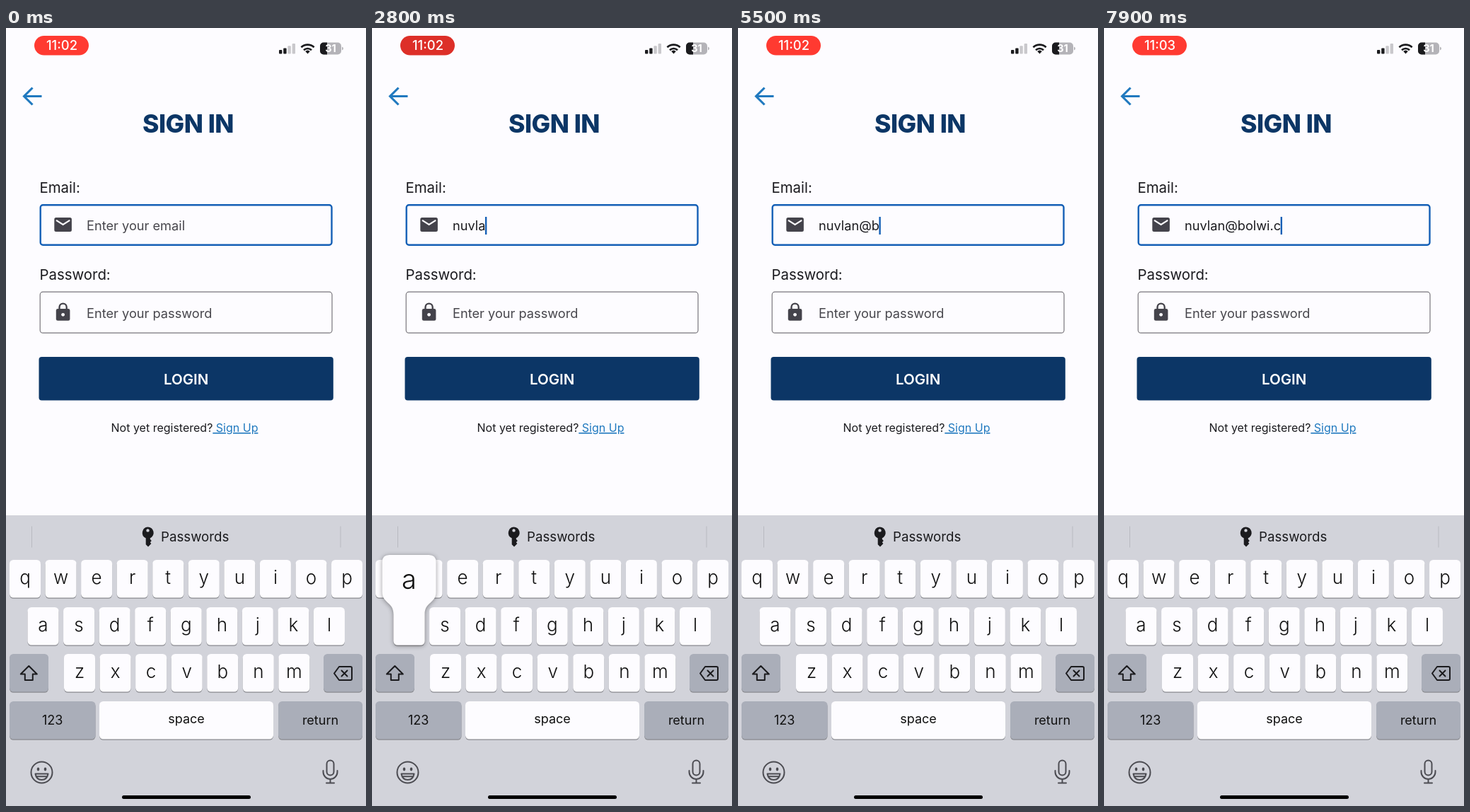
An HTML page for the animation above (8 s loop, 509x1100 px).

```html
<!DOCTYPE html>
<html lang="en">
<head>
<meta charset="utf-8">
<title>Sign in</title>
<style>
html, body { margin: 0; width: 100%; height: 100%; overflow: hidden; background: #fdfcff; }
svg { display: block; width: 509px; height: 1100px; font-family: Inter, "Open Sans", sans-serif; }
.mid { text-anchor: middle; }
.line { fill: none; stroke-linecap: round; stroke-linejoin: round; }
#popup path { fill: #fdfcff; filter: drop-shadow(0 1px 3px #0006); }
</style>
</head>
<body>
<svg viewBox="0 0 509 1100">
  <!-- status bar -->
  <rect id="pill" x="40" y="11" width="77" height="27.5" rx="13.75"/>
  <text id="clock" class="mid" x="79" y="31" font-size="18.4" font-weight="500" fill="#fff"></text>
  <g fill="#1b1b1e">
    <rect x="386" y="31" width="4.4" height="5.5" rx="1"/>
    <rect x="392.2" y="28.5" width="4.4" height="8" rx="1"/>
    <g fill="#c9c8cc">
      <rect x="398.4" y="25.3" width="4.4" height="11.2" rx="1"/>
      <rect x="404.6" y="22" width="4.4" height="14.5" rx="1"/>
    </g>
    <path d="M426.5 36.5l-3.3-3.4a4.8 4.8 0 0 1 6.6 0z"/>
  </g>
  <g class="line" stroke="#1b1b1e" stroke-width="2.7" style="stroke-linecap:butt">
    <path d="M421 31.2a8 8 0 0 1 11 0M417.4 27.3a13.2 13.2 0 0 1 18.2 0"/>
  </g>
  <rect x="444" y="20.5" width="30" height="17" rx="5" fill="#b4b3b8"/>
  <path d="M454 20.5h-5a5 5 0 0 0-5 5v7a5 5 0 0 0 5 5h5z" fill="#1b1b1e"/>
  <path d="M475 26.5q2 .7 2 2.5t-2 2.5z" fill="#b4b3b8"/>
  <text class="mid" x="459" y="34.3" font-size="14.5" font-weight="700" fill="#fff">31</text>

  <!-- form -->
  <path d="M50.5 96.5H26M37.5 84.5l-12 12 12 12" fill="none" stroke="#2079bf" stroke-width="3.1"/>
  <text class="mid" x="257.5" y="147.5" font-size="35.5" font-weight="800" letter-spacing="-.5" fill="#0c3666">SIGN IN</text>
  <g font-size="20.4" fill="#1b1b1f">
    <text x="47.5" y="233">Email:</text>
    <text x="47.5" y="356">Password:</text>
  </g>
  <rect x="48.7" y="250.2" width="411.8" height="56.6" rx="3.5" fill="none" stroke="#1560b6" stroke-width="2.4"/>
  <rect x="48.2" y="373.2" width="412.8" height="58" rx="4" fill="none" stroke="#78767c" stroke-width="1.2"/>
  <rect x="68.3" y="268" width="24.6" height="20" rx="2.5" fill="#44434b"/>
  <path d="M71 271.8l9.6 6.2 9.6-6.2" fill="none" stroke="#fdfcff" stroke-width="2.2"/>
  <rect x="70.8" y="397" width="19.6" height="16.8" rx="2.4" fill="#44434b"/>
  <path d="M75.5 398v-3.3a5.1 5.1 0 0 1 10.2 0v3.3" fill="none" stroke="#44434b" stroke-width="2.4"/>
  <circle cx="80.6" cy="405.3" r="2.4" fill="#fdfcff"/>
  <text id="email" x="114" y="286" font-size="18.2"></text>
  <rect id="caret" y="267" width="2.4" height="25" fill="#1560b6"/>
  <text x="114" y="409.7" font-size="18.2" fill="#47464c">Enter your password</text>
  <rect x="46.5" y="465" width="416.3" height="61.5" rx="4" fill="#0c3666"/>
  <text class="mid" x="254.6" y="503.6" font-size="20.5" font-weight="600" fill="#fff">LOGIN</text>
  <text x="148.5" y="571" font-size="16" fill="#1b1b1f" xml:space="preserve">Not yet registered?<tspan fill="#2079bf" text-decoration="underline"> Sign Up</tspan></text>

  <!-- keyboard -->
  <rect y="689" width="509" height="411" fill="#d2d3da"/>
  <path d="M36.5 704.5v30M473 704.5v30" stroke="#b9bac1"/>
  <path fill-rule="evenodd" fill="#1b1b1e" d="M200.5 705.5a8.2 8.2 0 0 1 3.3 15.7v1.6l2 2.2-2 2.2 1.6 1.9-4.4 4.4-3.3-3.2v-9.1a8.2 8.2 0 0 1 2.8-15.7zm0 2.7a2.2 2.2 0 1 0 0 4.4 2.2 2.2 0 1 0 0-4.4z"/>
  <text x="219" y="726.3" font-size="18.7" fill="#1b1b1e">Passwords</text>
  <g id="common"></g>
  <g id="letters"></g>
  <g id="symbols"></g>
  <g class="line" stroke="#1b1b1e" stroke-width="2">
    <path d="M471 903h16q2 0 2 2v15q0 2-2 2h-16l-7-9.5z"/>
    <path d="M474.5 908.5l8 8m0-8l-8 8"/>
  </g>
  <g class="line" stroke="#4c4c52" stroke-width="2">
    <circle cx="50.5" cy="1052.5" r="15"/>
    <path d="M41.5 1054.5h18q-1.5 8.5-9 8.5t-9-8.5zM43 1058.3h15"/>
    <rect x="453.5" y="1035.5" width="10" height="21" rx="5"/>
    <path d="M448.5 1050v2a10 10 0 0 0 20 0v-2M458.5 1062v5.5M453 1067.5h11"/>
  </g>
  <g fill="#4c4c52"><ellipse cx="45.5" cy="1048" rx="1.8" ry="2.4"/><ellipse cx="55.5" cy="1048" rx="1.8" ry="2.4"/></g>
  <rect x="164" y="1085" width="182" height="5" rx="2.5"/>
  <g id="popup"><path/><text class="mid" font-weight="300" font-size="38" fill="#111"></text></g>
</svg>
<script>
const $ = id => document.getElementById(id);
const LOOP = 8000, PITCH = 50.56, KEY_W = 44, KEY_H = 53.5;
const WHITE = '#fdfcff', GRAY = '#aaaeb9';
const spots = {};

function key(box, x, y, w, label, o = {}) {
  const rect = (dy, fill) =>
    `<rect x="${x}" y="${y + dy}" width="${w}" height="${KEY_H}" rx="5.5" fill="${fill}"/>`;
  const safe = label.replace('&', '&amp;');
  box.innerHTML += rect(1.3, '#898a8f') + rect(0, o.fill || WHITE) +
    `<text class="mid" x="${x + w / 2}" y="${y + (o.base || 34)}" font-size="${o.size || 26}"
      font-weight="${o.weight || 300}" fill="#111">${safe}</text>`;
  spots[label] = { x, y, w };
}

function row(box, chars, x, y, o = {}) {
  const w = o.w || KEY_W, pitch = o.pitch || PITCH;
  [...chars].forEach((c, i) => key(box, x + i * pitch, y, w, c, o));
}

const word = { size: 18, weight: 400, base: 31 };
const dark = { ...word, fill: GRAY, base: 33 };
const sym = { size: 25, weight: 400, base: 36 };
const [common, letters, symbols] = ['common', 'letters', 'symbols'].map($);

key(common, 449, 885, 55, '', dark);
key(common, 132, 952, 246, 'space', word);
key(common, 385, 952, 119, 'return', dark);

row(letters, 'qwertyuiop', 5, 752);
row(letters, 'asdfghjkl', 30.5, 819);
row(letters, 'zxcvbnm', 82, 885);
key(letters, 5, 885, 55, '', dark);
key(letters, 5, 952, 121.5, '123', dark);
letters.innerHTML += `<path class="line" stroke="#1b1b1e" stroke-width="2"
  d="M32.3 902l11.5 11.5h-6v8.5h-11v-8.5h-6z"/>`;

row(symbols, '1234567890', 5, 752, sym);
row(symbols, '-/:;()$&@″', 5, 819, { ...sym, base: 35 });
row(symbols, '.,?!′', 85, 885, { ...sym, w: 62, pitch: 68.5, base: 35 });
key(symbols, 5, 885, 55, '#+=', { ...dark, size: 14.5 });
key(symbols, 5, 952, 121.5, 'ABC', dark);

// typed text and the moment each character lands
const typed = 'nuvlan@bolwi.c';
const times = [500, 850, 1900, 2350, 2800, 3350, 4150, 5400, 5700, 5860, 6030, 6200, 7000, 7700];
const symbolSpans = [[3700, 4450], [6600, 7350]];

function showPopup(c) {
  $('popup').style.display = c ? '' : 'none';
  if (!c) return;
  const { x, y, w } = spots[c], r = x + w, pad = w > KEY_W ? 8 : 16;
  const L = x - pad, R = r + pad, T = y - 74, B = y + KEY_H;
  const [shape, text] = $('popup').children;
  shape.setAttribute('d', `M${L + 10} ${T}H${R - 10}Q${R} ${T} ${R} ${T + 10}V${y - 22}
    C${R} ${y - 5} ${r} ${y - 8} ${r} ${y + 10}V${B - 6}Q${r} ${B} ${r - 6} ${B}
    H${x + 6}Q${x} ${B} ${x} ${B - 6}V${y + 10}C${x} ${y - 8} ${L} ${y - 5} ${L} ${y - 22}
    V${T + 10}Q${L} ${T} ${L + 10} ${T}Z`);
  text.setAttribute('x', x + w / 2);
  text.setAttribute('y', y - 26);
  text.textContent = c;
}

function draw(now) {
  const t = now % LOOP;
  const count = times.filter(k => k <= t).length;
  const email = $('email');
  email.textContent = count ? typed.slice(0, count) : 'Enter your email';
  email.setAttribute('fill', count ? '#1b1b1f' : '#47464c');

  const since = t - (count ? times[count - 1] : -500);
  $('caret').style.display = since % 1000 < 500 ? '' : 'none';
  $('caret').setAttribute('x', count ? 114 + email.getComputedTextLength() - .5 : 114);

  const pressed = times.findIndex(k => t >= k - 60 && t < k + 80);
  showPopup(typed[pressed]);

  const onSymbols = symbolSpans.some(([a, b]) => t >= a && t < b);
  letters.style.display = onSymbols ? 'none' : '';
  symbols.style.display = onSymbols ? '' : 'none';

  // recording pill dims once every two seconds
  const off = (t + 300) % 2000 - 1000;
  const dim = Math.max(0, Math.abs(off) < 750 ? .5 + .5 * Math.cos(Math.PI * off / 750) : 0);
  $('pill').setAttribute('fill', `rgb(${255 - 36 * dim},${58 - 11 * dim},${49 - 9 * dim})`);
  $('clock').textContent = t < 7000 ? '11:02' : '11:03';
}

const start = performance.now();
(function tick() {
  draw(performance.now() - start);
  requestAnimationFrame(tick);
})();
</script>
</body>
</html>
```
